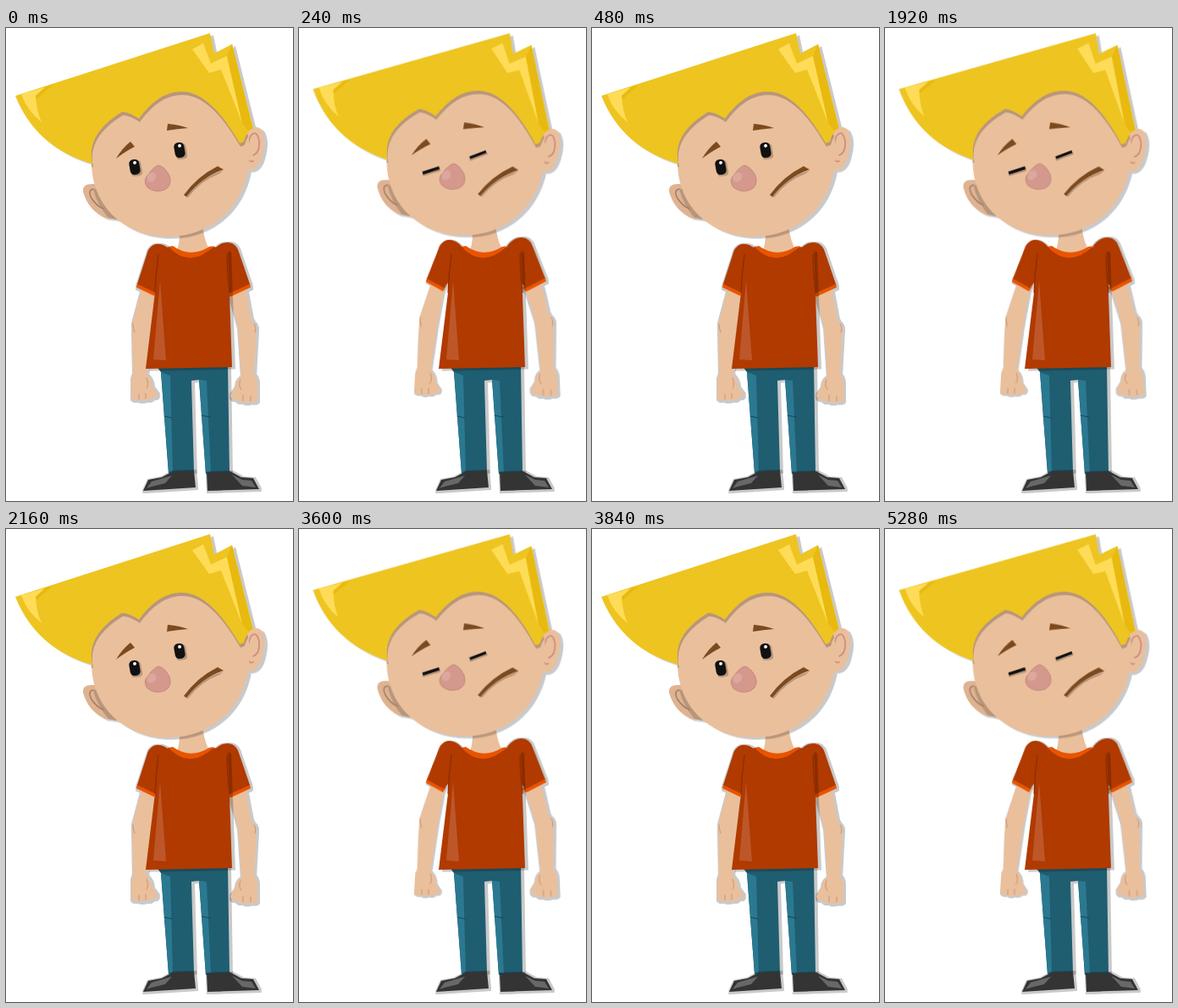
Animation of 339x558 px, one loop 5.4 s. Source, as an HTML page:

```html
<!DOCTYPE html>
<html lang="en">
<head>
<meta charset="utf-8">
<title>Sad boy</title>
<style>
  html, body { margin: 0; width: 100%; height: 100%; overflow: hidden; background: #fff; }
  svg { display: block; width: 100%; height: 100%; }
  .skin { fill: #eabf9c; }
  .shirt { fill: #b03a00; }
  .trim { fill: #e85400; }
  .hair { fill: #eec421; }
  .shine { fill: #ffdc57; }
  .fold { fill: #e8b90f; }
  .brown { fill: #7c4a1f; }
  .shade { fill: #b8967b; }
  .jeans { fill: #1f5d70; }
  .jeansLight { fill: #2b7891; }
  .shoe { fill: #343434; }
  .gloss { fill: #686868; }
  .line { fill: none; stroke-linecap: round; stroke-linejoin: round; }
  .seam { stroke: #8a2d00; stroke-width: 1.2; }
  .crease { stroke: #cf9c7c; stroke-width: 1.2; }
</style>
</head>
<body>
<svg viewBox="0 0 339 558">
  <defs>
    <filter id="cast" filterUnits="userSpaceOnUse" x="0" y="0" width="339" height="558" color-interpolation-filters="sRGB">
      <feDropShadow dx="4" dy="2.5" stdDeviation="0" flood-color="#000" flood-opacity=".21"/>
    </filter>
    <filter id="halo" filterUnits="userSpaceOnUse" x="0" y="0" width="339" height="558" color-interpolation-filters="sRGB">
      <feMorphology in="SourceAlpha" operator="dilate" radius="1.5"/>
      <feOffset dx="1" dy="1" result="edge"/>
      <feFlood flood-color="#000" flood-opacity=".21"/>
      <feComposite in2="edge" operator="in" result="rim"/>
      <feMerge><feMergeNode in="rim"/><feMergeNode in="SourceGraphic"/></feMerge>
    </filter>
    <path id="faceShape" d="M101 158C94 118 126 70 200 70C262 70 288 108 288 145C288 206 246 247 190 246C140 246 101 210 101 158Z"/>
    <path id="hairShape" d="M11 80L241 6L246 30L267 19L292 118Q284 122 281 134L276 136C258 105 235 75 207 75Q180 75 157 107Q145 99 137 99Q94 125 102 160Q36 142 11 80Z"/>
    <clipPath id="faceClip"><use href="#faceShape"/></clipPath>
  </defs>

  <g filter="url(#cast)">
    <path class="jeans" d="M177 398L262 397L264 524L236 526L228 415L219 416L222 523L192 525L183 406Z"/>
    <path class="jeansLight" d="M183 406L194 410L197 523L192 525Z M228 415L237 416L242 525L236 526Z"/>
    <path class="line" stroke="#174858" d="M187 458L196 460M231 457L241 459"/>
  </g>
  <g filter="url(#halo)">
    <path class="shoe" d="M162 546L168 533L184 530L197 523L222 522L224 542Z"/>
    <path class="gloss" d="M166 543L172 535L196 528L188 537L172 541Z"/>
    <path class="shoe" d="M237 524L265 523L278 530L292 531L299 544L238 546Z"/>
    <path class="gloss" d="M267 527L279 533L290 534L295 542L279 540Z"/>
  </g>

  <path class="skin" d="M205 232L232 232Q234 250 240 261Q222 273 202 262Q206 252 205 232Z"/>

  <g id="armL" filter="url(#halo)">
    <path class="skin" d="M160 308L176 313L171 352L166 409Q173 416 173 424L179 432Q178 437 173 436Q169 441 165 438Q160 442 156 438Q151 441 148 436L148 414L150 408L149 358L149 349Z"/>
    <path class="line crease" d="M166 413Q169 421 166 425M157 432V438M165 431V437M150 349Q150 354 152 359"/>
    <path class="trim" d="M155 301L154 306L175 316L178 310Z"/>
    <path class="shirt" d="M194 262Q184 252 174 256Q168 259 166 268L155 302L176 312L190 290Z"/>
  </g>
  <g id="armR" filter="url(#halo)">
    <path class="skin" d="M264 315L283 307L290 344L296 354L293 409Q297 414 297 420L297 439Q293 444 289 440Q284 445 280 440Q275 443 272 438Q266 439 265 433L271 424Q271 416 278 411L274 352Z"/>
    <path class="line crease" d="M277 415Q274 422 278 426M280 433V440M289 434V440M293 349Q296 353 294 359"/>
    <path class="trim" d="M260 312L265 317L289 306L288 301Z"/>
    <path class="shirt" d="M245 262Q255 250 267 254Q273 257 275 264L288 302L264 313L250 290Z"/>
  </g>

  <g filter="url(#cast)">
    <path class="shirt" d="M178 262L193 258Q218 280 245 258L262 262L264 315L267 400L165 402L176 312Z"/>
  </g>
  <path class="trim" d="M192 258Q217 285 246 257L240 258Q218 272 197 257Z"/>
  <path class="line seam" d="M180 267Q177 290 176 312M261 267Q261 290 264 312"/>
  <path fill="#bd5729" d="M182 298L189 392L174 391Z"/>

  <g id="head" filter="url(#cast)">
    <path fill="#dfb391" d="M104 184Q90 183 91 193Q97 215 117 224L130 225L124 190Z"/>
    <path class="shade" d="M103 190Q107 207 121 224L131 226L126 188Z"/>
    <path class="line" stroke="#a27b65" stroke-width="1.5" d="M103 190Q96 191 101 201Q108 211 115 213"/>
    <path class="skin" d="M284 120Q294 114 301 119Q308 130 303 149Q299 167 287 168L275 160Z"/>
    <path class="line" stroke="#cd8f82" stroke-width="1.8" d="M292 150Q300 147 299 133Q296 119 289 127Q284 138 286 154Q288 159 292 157"/>
    <use href="#faceShape" class="skin"/>
    <g clip-path="url(#faceClip)"><use href="#hairShape" class="shade" x="1" y="4"/></g>
    <use href="#hairShape" class="hair"/>
    <path class="shine" d="M18 78L46 70L35 80Q36 98 42 111Q25 98 18 78Z"/>
    <path class="fold" d="M46 70L55 67L36 84L35 80Z"/>
    <path class="shine" d="M220 25L233 18L242 42L261 33L279 112L254 49L240 53Z"/>
    <path class="fold" d="M261 33L267 19L291 118L286 121L279 112Z"/>

    <path class="brown" d="M130 154Q137 142 147 134L152 140Q142 145 130 154Z"/>
    <path class="brown" d="M191 113L190 121Q203 119 215 118Q204 114 191 113Z"/>

    <g id="open">
      <g transform="rotate(-10 152 164)">
        <rect x="147" y="157" width="13" height="18" rx="4" class="shade"/>
        <rect x="146" y="155" width="12" height="18" rx="5" fill="#111"/>
        <circle cx="153" cy="159" r="2" fill="#fff"/>
      </g>
      <g transform="rotate(-10 205 144)">
        <rect x="200" y="137" width="13" height="18" rx="4" class="shade"/>
        <rect x="199" y="135" width="12" height="18" rx="5" fill="#111"/>
        <circle cx="206" cy="139" r="2" fill="#fff"/>
      </g>
    </g>
    <g id="shut" class="line">
      <path stroke="#b8967b" stroke-width="2" d="M145 177L164 170.5M200 157L219 149"/>
      <path stroke="#111" stroke-width="3.5" stroke-linecap="butt" d="M144 174.5L163.5 167.5M199 154.5L218 146.5"/>
    </g>

    <path id="nose" fill="#d4988c" stroke="#bd8377" stroke-width=".8" d="M180 162Q187 163 193 174Q197 186 187 191Q176 195 167 188Q161 180 168 173Q174 164 180 162Z"/>
    <ellipse cx="172" cy="176" rx="5" ry="6" fill="#dca79e" transform="rotate(35 172 176)"/>

    <path class="shade" d="M212 199Q227 178 257 168L252 172Q230 180 215 200Z"/>
    <path class="brown" d="M210 197Q226 175 250 163L257 167Q231 176 213 199Z"/>
  </g>
</svg>
<script>
  const LOOP = 5400;
  const slumps = [[240, 480], [1920, 2160], [3600, 3840], [5280, LOOP]];
  const el = id => document.getElementById(id);
  const pose = (id, move) => el(id).setAttribute('transform', move);
  const show = (id, on) => el(id).setAttribute('visibility', on ? 'visible' : 'hidden');

  function draw(time) {
    const t = time % LOOP;
    const shrug = slumps.some(([from, to]) => t >= from && t < to);
    pose('head', shrug ? 'rotate(2 240 232)' : '');
    pose('armL', shrug ? 'translate(-1.5 -5) rotate(3.5 178 262)' : '');
    pose('armR', shrug ? 'translate(1 -6) rotate(-2.5 265 262)' : '');
    show('open', !shrug);
    show('shut', shrug);
  }

  function tick() {
    draw(performance.now());
    requestAnimationFrame(tick);
  }
  tick();
</script>
</body>
</html>
```
